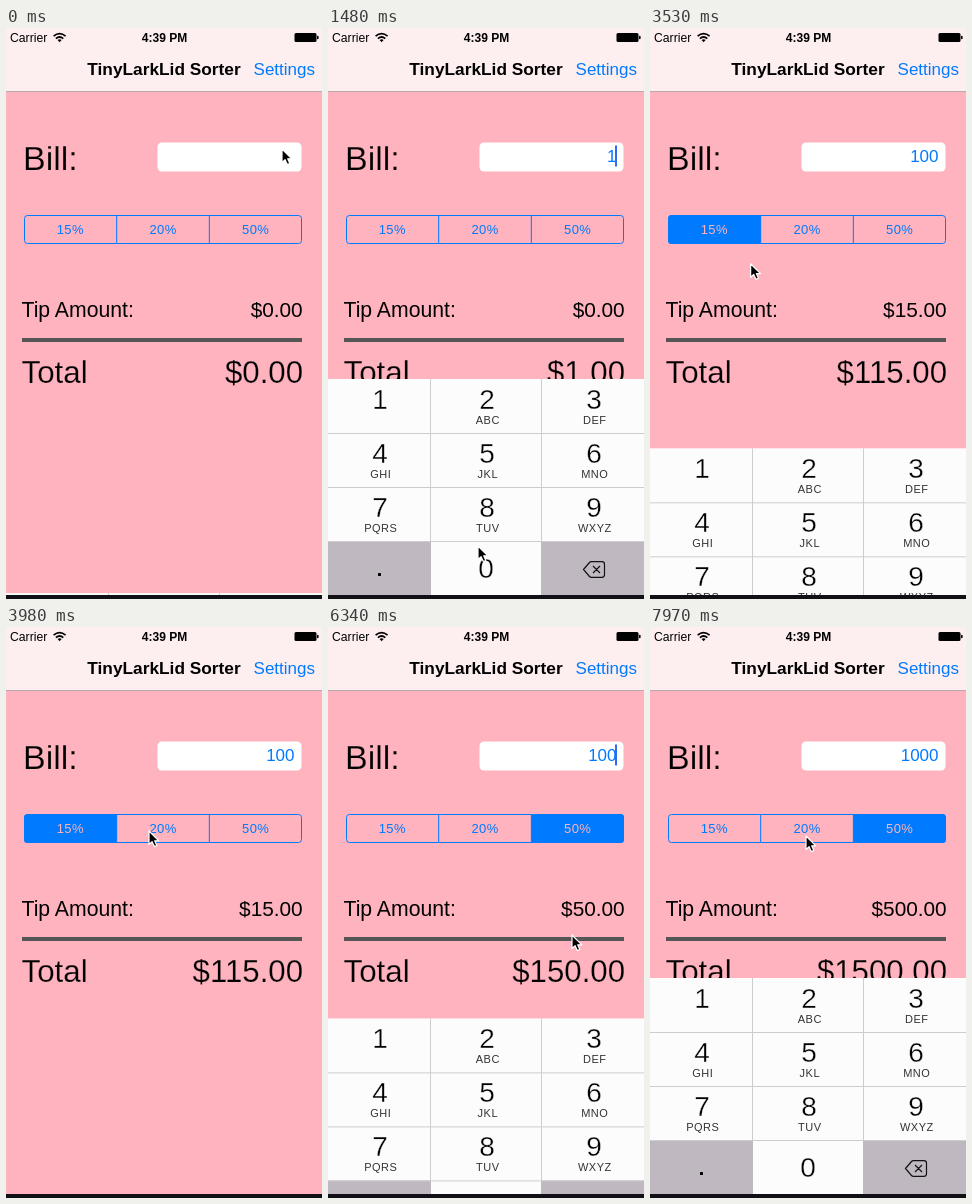
An HTML page for the animation above (8 s loop, 316 px wide and 571 px high).

```html
<!DOCTYPE html>
<html lang="en">
<head>
<meta charset="utf-8">
<title>Tip calculator</title>
<style>
html, body { margin: 0; width: 100%; height: 100%; overflow: hidden; background: #ffb3be; }
svg { display: block; width: 316px; height: 571px; font-family: "Liberation Sans", Arial, sans-serif; }
.mid { text-anchor: middle; }
.end { text-anchor: end; }
.blue { fill: #007aff; }
/* a thin outline in the backdrop colour makes the strokes lighter */
.light { stroke: #ffb3be; stroke-width: .25px; }
.digit { font-size: 28px; stroke: #fcfcfc; stroke-width: .4px; }
.sub { font-size: 11px; letter-spacing: .5px; fill: #333; }
.seg { font-size: 13px; letter-spacing: .4px; }
</style>
</head>
<body>
<svg id="stage" viewBox="0 0 316 571"></svg>
<script>
const LOOP = 8000, STEP = 147.6;   // the screen refreshes once per STEP
const PINK = '#ffb3be', BLUE = '#007aff', GREY = '#bfb8c1', KEY = '#fcfcfc';
const $ = id => document.getElementById(id);
const text = (x, y, s, cls = '', attrs = '') =>
  `<text x="${x}" y="${y}" class="${cls}" ${attrs}>${s}</text>`;
const rect = (x, y, w, h, fill, attrs = '') =>
  `<rect x="${x}" y="${y}" width="${w}" height="${h}" fill="${fill}" ${attrs}/>`;

const tips = [15, 20, 50];
const SEG = 278 / 3, ROW = 54, PAD = 4 * ROW;

function header() {
  return rect(0, 0, 316, 63, '#fdeef0') + rect(0, 63, 316, 1, '#b9a9ac') +
    text(4, 14, 'Carrier', '', 'font-size="12.2"') +
    `<path d="M47.6 8.2q6-5.2 12 0M49.9 10.6q3.7-3.2 7.4 0" fill="none" stroke="#000" stroke-width="1.7"/>
    <path d="M51.6 12q2-1.7 4 0l-2 2.2z"/>` +
    text(158.5, 13.5, '4:39 PM', 'mid', 'font-size="12" font-weight="700"') +
    rect(288.5, 5, 22, 9, '#000', 'rx="1.5"') + rect(311, 7.7, 1.6, 3.6, '#000', 'rx=".8"') +
    text(158, 47, 'TinyLarkLid Sorter', 'mid', 'font-size="17.3" font-weight="700"') +
    text(309, 47, 'Settings', 'end blue', 'font-size="17"');
}

function form() {
  const segs = tips.map((tip, i) =>
    rect(18 + i * SEG, 187, SEG, 29, BLUE, `id="fill${i}"`) +
    rect(17.5 + i * SEG, 187, i ? 1 : 0, 29, BLUE) +
    text(18 + (i + .5) * SEG, 205.5, tip + '%', 'mid seg', `id="seg${i}"`)).join('');
  return text(17, 141.5, 'Bill:', 'light', 'font-size="34"') +
    rect(151.5, 114.5, 144, 29, '#fff', 'rx="4.5"') +
    text(288.5, 134, '', 'end blue', 'id="bill" font-size="17"') +
    rect(287, 117.5, 2, 21, '#3468ee', 'id="caret"') +
    `<g clip-path="url(#round)">${segs}</g>` +
    rect(18.5, 187.5, 277, 28, 'none', `rx="3" stroke="${BLUE}"`) +
    text(15.5, 289, 'Tip Amount:', '', 'font-size="21.2"') +
    text(296.700, 289, '', 'end', 'id="tip" font-size="20.8"') +
    rect(16, 310, 280, 4, '#555') +
    text(15.5, 355, 'Total', 'light', 'font-size="31.3"') +
    text(297, 355, '', 'end light', 'id="total" font-size="31.2"');
}

function keypad() {
  const letters = ['', 'ABC', 'DEF', 'GHI', 'JKL', 'MNO', 'PQRS', 'TUV', 'WXYZ'];
  const keys = letters.map((s, i) => {
    const x = 52 + i % 3 * 107, y = Math.floor(i / 3) * ROW;
    return text(x, y + 29.5, i + 1, 'mid digit') + text(x + .8, y + 45, s, 'mid sub');
  }).join('');
  return rect(0, 0, 316, PAD, KEY) +
    rect(0, 0, 102.5, ROW, GREY, 'id="key1"') +
    rect(0, 162, 103, ROW, GREY) + rect(213, 162, 103, ROW, GREY) +
    rect(103, 162, 110, ROW, GREY, 'id="key0"') +
    '<path d="M0 54.5H316M0 108.5H316M0 162.5H316M102.5 0V162M213.5 0V162" stroke="#cfccd0"/>' +
    keys + text(158, 198.5, '0', 'mid digit') +
    rect(50, 194, 3, 3, '#000', 'rx=".6"') +
    `<path d="M255.5 190.5l6-7q.7-.8 2-.8h10.5q2.5 0 2.5 2.5v10.6q0 2.5-2.5 2.5h-10.5q-1.3 0-2-.8z
      M265 187l7 7M272 187l-7 7" fill="none" stroke="#111" stroke-width="1.2"/>`;
}

$('stage').innerHTML =
  '<clipPath id="round"><rect x="18" y="187" width="278" height="29" rx="3.5"/></clipPath>' +
  rect(0, 0, 316, 571, PINK) + header() + form() +
  `<g id="pad">${keypad()}</g>` + rect(0, 567, 316, 4, '#101016') +
  `<path id="arrow" d="M0 0V13.500L3.100 10.700L5.300 15.600L7.800 14.500L5.700 9.800H9.800Z"
    stroke="#fff" stroke-width="1.2" stroke-linejoin="round"/>`;

// What the user does: step, pointer place, tap
const stops = [
  [0, 276, 121, 'field'],
  [8, 50, 373, 'key1'],
  [10, 150, 518],
  [11, 147, 536, 'key0'],
  [13, 147, 536, 'key0'],
  [15, 113, 438],
  [16, 113, 210],
  [18, 113, 210],
  [20, 145, 197],
  [22, 66, 200, 'seg0'],
  [23.6, 95, 240, 'close'],
  [27, 143, 204],
  [30, 155, 204, 'seg1'],
  [32, 211, 191, 'seg2'],
  [34, 211, 191],
  [36, 230, 72],
  [38, 228, 125],
  [41.56, 236, 132, 'field'],
  [43, 244, 308],
  [47, 142, 543, 'key0'],
  [51, 142, 543],
  [54, 156, 209]
];
const TRAVEL = 6;   // longest pointer move, in steps

const clamp = p => Math.min(1, Math.max(0, p));
const slide = steps => 1 - (1 - clamp(steps * STEP / 500)) ** 3;
const money = v => '$' + v.toFixed(2);

function pointer(n) {
  const i = Math.max(1, stops.findIndex(s => s[0] >= n));
  const [n0, x0, y0] = stops[i - 1], [n1, x1, y1] = stops[i];
  const k = clamp((n - n0) / Math.min(TRAVEL, n1 - n0));
  return [x0 + (x1 - x0) * k, y0 + (y1 - y0) * k];
}

// Replays every tap made up to step n
function replay(n) {
  const s = { bill: '', choice: -1, pressed: '', pad: 0, focus: false, last: 0 };
  for (const [at, , , tap] of stops) {
    if (!tap || at > n) continue;
    const age = n - at, id = tap.slice(-1);
    if (tap === 'field' || tap === 'close') {
      s.focus = tap === 'field';
      s.pad += (s.focus ? 1 : -1) * slide(age + .01);
      s.last = at;
    } else if (tap.startsWith('seg')) {
      s.choice = +id;
    } else {
      s.last = at;
      if (age < 1) s.pressed = id;
      else s.bill += id;
    }
  }
  s.caret = s.focus && n > 0 && (n - s.last) % 8 < 5;
  return s;
}

function draw(time) {
  const n = Math.floor((time + 12) / STEP), s = replay(n);
  const tip = s.choice < 0 ? 0 : s.bill * tips[s.choice] / 100;
  const show = (id, on) => $(id).setAttribute('opacity', on ? 1 : 0);

  $('bill').textContent = s.bill;
  $('tip').textContent = money(tip);
  $('total').textContent = money(+s.bill + tip);
  show('caret', s.caret);
  tips.forEach((_, i) => {
    show('fill' + i, i === s.choice);
    $('seg' + i).setAttribute('fill', i === s.choice ? PINK : BLUE);
  });
  for (const k of '01') show('key' + k, s.pressed === k);
  $('pad').setAttribute('transform', `translate(0 ${567 - PAD * s.pad})`);
  $('arrow').setAttribute('transform', `translate(${pointer(n)})`);
}

function tick() {
  draw(performance.now() % LOOP);
  requestAnimationFrame(tick);
}
tick();
</script>
</body>
</html>
```
